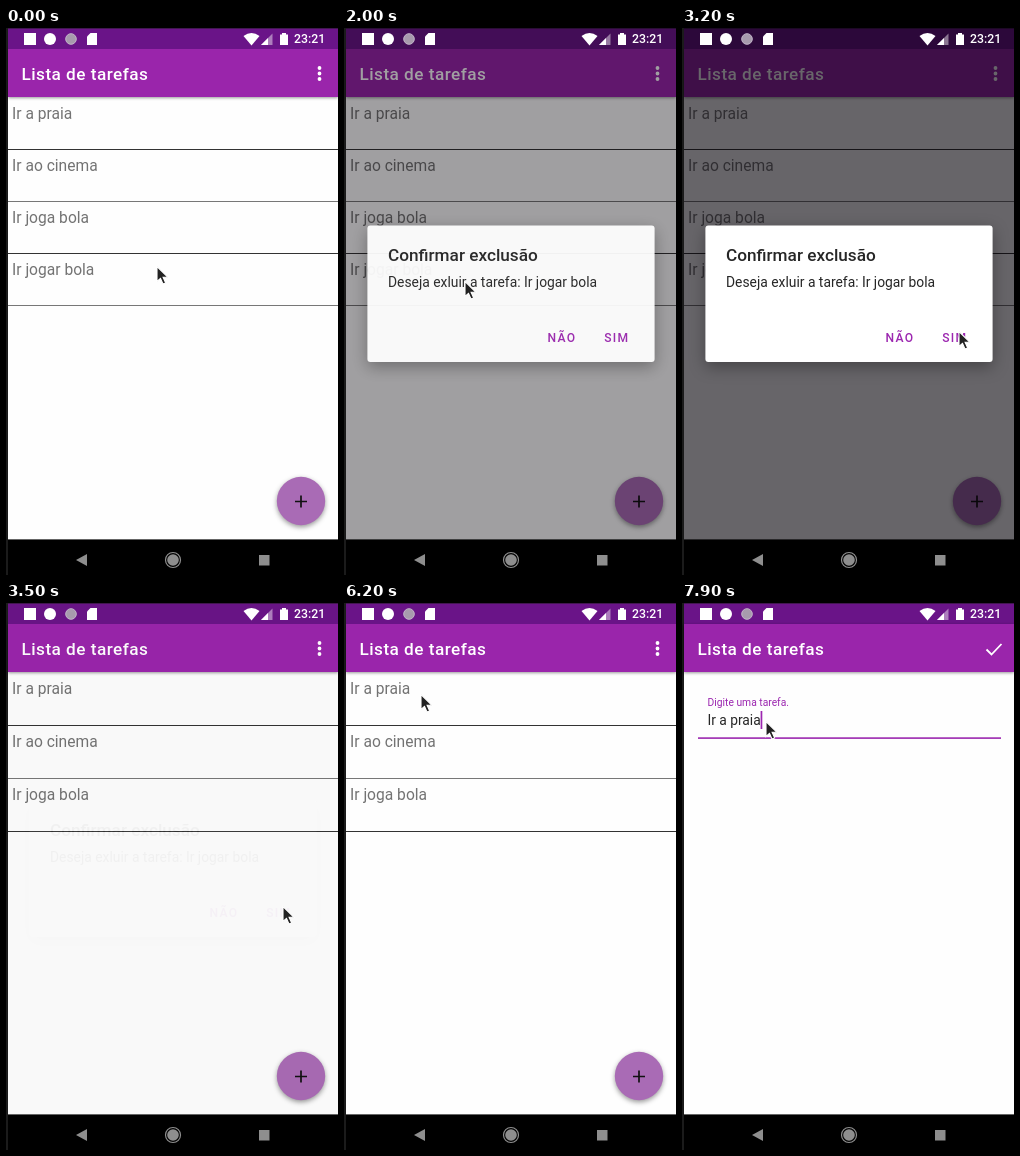
Write an HTML page that moves like this. It is 332 px wide and 547 px high and loops after 8 s.

```html
<!DOCTYPE html>
<html lang="pt">
<head>
<meta charset="utf-8">
<title>Lista de tarefas</title>
<style>
  html, body { margin: 0; width: 100%; height: 100%; overflow: hidden; background: #1b1b1b; }
  svg { display: block; width: 332px; height: 547px; font-family: Roboto, sans-serif; }
  .bar { fill: #9a25ab; filter: drop-shadow(0 1px 1.5px #0006); }
  .title { font-weight: 500; font-size: 17.2px; letter-spacing: .47px; fill: #fff; }
  .item { font-size: 15.6px; fill: #737373; }
  .action { font-weight: 500; font-size: 12.1px; letter-spacing: 1.3px; fill: #9c27b0; }
  .accent { fill: #9c27b0; }
  .ink { fill: #262626; }
</style>
</head>
<body>
<svg viewBox="0 0 332 547">
  <defs>
    <g id="header">
      <rect class="bar" x="2" y="21" width="330" height="48"/>
      <text class="title" x="15.4" y="52">Lista de tarefas</text>
    </g>
  </defs>

  <rect x="2" y="1" width="330" height="511" fill="#fefefe"/>
  <rect id="press" x="2" y="70" width="330" height="52" fill="#e2e2e2"/>
  <g id="list"></g>
  <use href="#header"/>
  <rect x="2" y=".5" width="330" height="20.5" fill="#6a1488"/>
  <path d="M313.5 40v0M313.5 45.5v0M313.5 51v0" stroke="#fff" stroke-width="3.8" stroke-linecap="round"/>
  <circle cx="295" cy="473" r="24.2" fill="#a96bb5" style="filter:drop-shadow(0 2px 2.5px #0006)"/>
  <path d="M289 473.5h12M295 467.5v12" stroke="#111" stroke-width="1.7"/>

  <rect id="scrim" x="2" width="330" height="512" fill="#040007"/>

  <g id="dialog">
    <rect x="23.4" y="197.6" width="287.2" height="136.3" rx="3" fill="#fff" style="filter:drop-shadow(0 5px 8px #0005)"/>
    <text class="ink" x="44" y="232.7" font-size="17.2" font-weight="500">Confirmar exclusão</text>
    <text class="ink" x="44" y="258.8" font-size="13.85">Deseja exluir a tarefa: Ir jogar bola</text>
    <text class="action" x="203.5" y="314.2">NÃO</text>
    <text class="action" x="260.2" y="314.2">SIM</text>
  </g>

  <g id="toast">
    <rect x="66" y="448" width="202" height="42" rx="21" fill="#ededed"/>
    <text class="ink" x="86.8" y="474" font-size="12">Sucesso ao excluir a Tarefa&#160; :)</text>
  </g>

  <g id="edit">
    <rect x="2" y="21" width="330" height="491" fill="#fefefe"/>
    <use href="#header"/>
    <path d="M304.5 46.5l5 5 10-10.5" fill="none" stroke="#fff" stroke-width="1.8"/>
    <text class="accent" x="25.5" y="103.3" font-size="10.3">Digite uma tarefa.</text>
    <text class="ink" x="25.4" y="122.4" font-size="13.8">Ir a praia</text>
    <rect class="accent" x="16" y="134.3" width="303" height="1.6"/>
    <rect id="caret" class="accent" y="108" width="1.7" height="18"/>
  </g>

  <g fill="#fff">
    <rect x="18" y="5" width="12" height="12"/>
    <circle cx="44" cy="11" r="6"/>
    <circle cx="65" cy="11" r="5.3" fill="#a79bad" stroke="#c3b5ca"/>
    <path d="M84.5 5H91V17H81V8.5Z"/>
    <path d="M237.5 8Q245.5 2 253.5 8L245.5 17.5Z"/>
    <path d="M266.5 5.5V17H255Z" opacity=".45"/>
    <path d="M262 10V17H255Z"/>
    <path d="M274 6.5h2V5h4v1.500h2V17h-8Z"/>
    <text x="288" y="15.4" font-size="12.3" font-weight="500">23:21</text>
  </g>

  <rect x="2" y="511.4" width="330" height="36"/>
  <g fill="#8e8e8e">
    <path d="M70 532l11-6v12Z"/>
    <circle cx="167" cy="532" r="5.8"/>
    <circle cx="167" cy="532" r="7.5" fill="none" stroke="#8e8e8e" stroke-width="1.2"/>
    <rect x="253" y="527" width="10.5" height="10.5"/>
  </g>

  <path id="mouse" d="M0 .5V15.5L3.500 12.300 6 18 8.600 16.900 6.100 11.300H11Z" fill="#222" stroke="#fff" stroke-width="1.1"/>
</svg>
<script>
const $ = id => document.getElementById(id);
const LOOP = 8000, STEP = 100;
const DELETED = 3400, OPENED = 6900, CLICKED = 7800;
const tasks = ['Ir a praia', 'Ir ao cinema', 'Ir joga bola', 'Ir jogar bola'];

// Each move glides the pointer to x, y between two times
const start = { x: 151, y: 238 };
const moves = [
  { from: 600, to: 1000, x: 121, y: 253 },
  { from: 2400, to: 2700, x: 253, y: 313 },
  { from: 2800, to: 3200, x: 277, y: 303 },
  { from: 3800, to: 4200, x: 219, y: 262 },
  { from: 4200, to: 4600, x: 121, y: 86 },
  { from: 5000, to: 5100, x: 115, y: 95 },
  { from: 5200, to: 6100, x: 79, y: 108 },
  { from: 6100, to: 6200, x: 77, y: 91 },
  { from: 6900, to: 7500, x: 84, y: 118 }
];

const progress = (t, from, to) => Math.min(1, Math.max(0, (t - from) / (to - from)));
const fade = (t, inFrom, inTo, outFrom, outTo) => progress(t, inFrom, inTo) * (1 - progress(t, outFrom, outTo));

function pointer(t) {
  return moves.reduce((p, m) => {
    const k = progress(t, m.from, m.to);
    return { x: p.x + (m.x - p.x) * k, y: p.y + (m.y - p.y) * k };
  }, start);
}

function set(el, attrs) {
  for (const name in attrs) el.setAttribute(name, attrs[name]);
}

const rows = tasks.map((task, i) => {
  const make = tag => $('list').appendChild(document.createElementNS('http://www.w3.org/2000/svg', tag));
  const text = make('text'), line = make('rect');
  text.textContent = task;
  set(text, { class: 'item', x: 6 });
  set(line, { x: 2, width: 330, height: 1, fill: i % 2 ? '#777' : '#333' });
  return { text, line };
});

function drawList(deleted) {
  const pitch = deleted ? 53 : 52, top = deleted ? 122 : 121;
  rows.forEach(({ text, line }, i) => {
    const opacity = deleted && i === rows.length - 1 ? 0 : 1;
    set(text, { y: 91 + i * pitch, opacity });
    set(line, { y: top + i * pitch, opacity });
  });
}

function draw(now) {
  const t = Math.floor(now % LOOP / STEP) * STEP;
  const { x, y } = pointer(t), open = progress(t, OPENED, OPENED + 400);
  drawList(t >= DELETED);
  set($('mouse'), { transform: `translate(${x} ${y})` });
  set($('scrim'), { opacity: .6 * fade(t, 1800, 2120, 3300, 3507) });
  set($('dialog'), { opacity: fade(t, 1850, 2010, 3300, 3507) });
  set($('toast'), { opacity: fade(t, 3600, 4000, 5700, 6100) });
  set($('press'), { opacity: t >= OPENED ? 1 : 0 });
  set($('edit'), { opacity: open, transform: `translate(0 ${30 * (1 - open) ** 2})` });
  set($('caret'), { x: t < CLICKED ? 25.2 : 78.6, opacity: t < OPENED + 500 ? 0 : 1 });
  requestAnimationFrame(draw);
}
requestAnimationFrame(draw);
</script>
</body>
</html>
```
